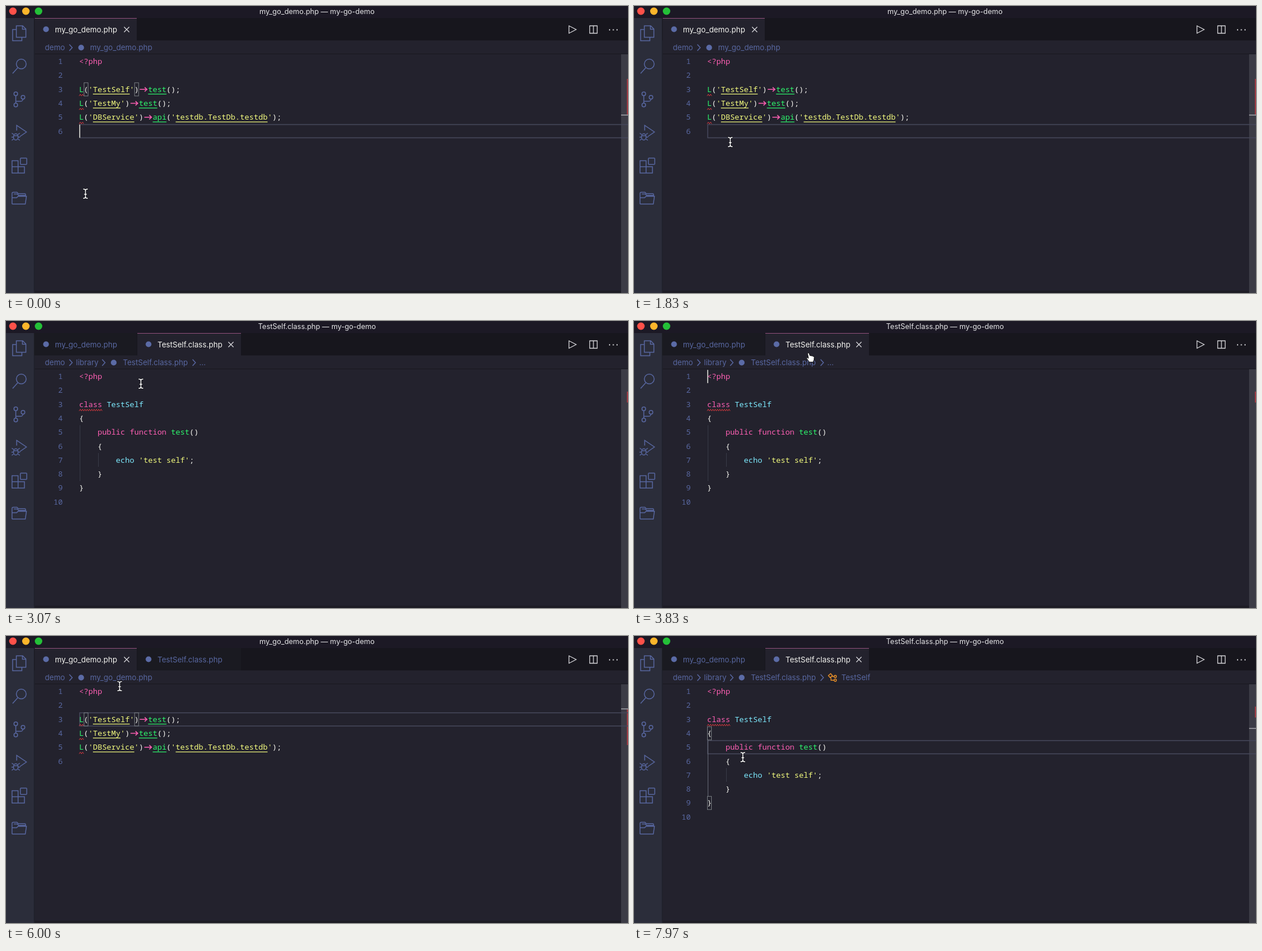
Animation of 1080x500 px, one loop 8 s. Source, as an HTML page:

```html
<!DOCTYPE html>
<html lang="en">
<head>
<meta charset="utf-8">
<title>Go to definition</title>
<style>
  html, body { margin: 0; width: 100%; height: 100%; overflow: hidden; background: #23222d; }
  svg { display: block; width: 1080px; height: 500px; }
  text { white-space: pre; font: 13.1px Inter, sans-serif; }
  .code text { font: 13.3px "Noto Sans Mono", monospace; }
  .ui text, .num { fill: #5867a0; }
  .line { fill: none; stroke: #5867a0; stroke-width: 1.5; }
  .tool { fill: none; stroke: #d4d4d8; stroke-width: 1.3; }
  .dot { fill: #5b6ba6; }
  .w { fill: #f8f8f2; } .g { fill: #2df86d; } .y { fill: #f3fb7e; }
  .p { fill: #fd5fb3; } .c { fill: #7de9fd; }
  .arrow { fill: none; stroke: #fd5fb3; stroke-width: 1.5; }
  .wave { fill: none; stroke: #e83a40; stroke-width: .9; }
  .match { fill: none; stroke: #777c80; }
  .class-icon { fill: none; stroke: #ee9327; stroke-width: 1.3; }
  #title { font-size: 12.5px; fill: #e4e4e6; text-anchor: middle; }
  #beam { fill: none; stroke-linecap: round; }
</style>
</head>
<body>
<svg viewBox="0 0 1080 500">
  <defs>
    <path id="beamShape" d="M-3.5 -8Q0 -8 0 -5.5Q0 -8 3.5 -8M0 -5.5V5.5M-3.5 8Q0 8 0 5.5Q0 8 3.5 8M-1.8 1H1.8"/>
  </defs>
  <rect width="1080" height="500" fill="#23222d"/>
  <rect y="21" width="49" height="479" fill="#2b2d3a"/>
  <rect x="49" y="21" width="1031" height="39" fill="#17161d"/>
  <rect width="1080" height="21" fill="#1c1925"/>
  <circle cx="12" cy="9" r="6.5" fill="#ff5149"/>
  <circle cx="34.5" cy="9" r="6.5" fill="#fdb52b"/>
  <circle cx="56.5" cy="9" r="6.5" fill="#24c038"/>
  <text id="title" x="540" y="13.5"></text>

  <g class="line">
    <path d="M18 34.5H29L34.5 40V54.5H18ZM28.5 35V40.5H34M18 41H11.5V60.5H27.5V55"/>
    <circle cx="26.5" cy="101" r="8.5"/><path d="M20.5 107.5L11.5 117.5"/>
    <circle cx="17" cy="153" r="3.2"/><circle cx="17" cy="172.5" r="3.2"/><circle cx="29.5" cy="159" r="3.2"/>
    <path d="M17 156.5V169M29.5 162.5Q29 166 25 166H17"/>
    <path d="M18.5 217V208L35.5 219.5L24 227.5"/>
    <ellipse cx="17" cy="228" rx="4" ry="5.5"/>
    <path d="M13 226H21M10 221.5L13.5 224M24 221.5L20.5 224M9.5 228.5H13M21 228.5H24.5M10 234L13.5 231.5M24 234L20.5 231.5"/>
    <path d="M10.5 269.5H21V291H10.5ZM10.5 280H32V291H21M32 280V291"/>
    <rect x="25" y="265" width="11" height="11" rx="1"/>
    <path d="M10.5 345V326.5Q10.5 324.5 12.5 324.5H19L21.5 327H32.5Q34 327 34 328.5V331M10.5 345H33.5L35.5 331.5H21L18.5 334H11M13.5 327.5H19.5L22 330H34"/>
  </g>
  <rect x="48.5" y="21" width="1" height="479" fill="#1d1e26"/>

  <g id="tabs" class="ui"></g>
  <g class="tool">
    <path d="M977.5 34.5L990 41L977.5 47.5Z"/>
    <path d="M1013.5 34.5H1026.5V47.5H1013.5ZM1020 34.5V47.5"/>
    <path d="M1047 41.5h2m4.5 0h2m4.5 0h2" stroke-width="2"/>
  </g>
  <g id="crumbs" class="ui"></g>
  <rect x="50" y="83" width="1030" height="1" fill="#18181f"/>
  <rect x="50" y="496" width="1030" height="4" fill="#1d1c25"/>
  <rect x="1068" y="84" width="12" height="416" fill="#3c3c46"/>
  <rect id="errors" x="1078" width="2" fill="#9d3a43"/>
  <rect id="ruler" x="1068" width="12" height="2" fill="#8b8b92"/>

  <rect id="current" x="128" width="960" height="23" fill="none" stroke="#45475a" stroke-width="1.6"/>
  <g id="demo" class="code"></g>
  <g id="self" class="code"></g>
  <rect id="caret" width="2" height="23" fill="#b9b9b6"/>
  <g id="mouse">
    <g id="beam">
      <use href="#beamShape" stroke="#15151b" stroke-width="3"/>
      <use href="#beamShape" stroke="#fff" stroke-width="1.4"/>
    </g>
    <path id="hand" d="M-4.5 -5Q-4 -7.5 -2 -6L-.5 -1.5Q1 -2.8 2.2 -1Q4 -2 5 -.2Q7 -.8 7 1.5L6.5 5.5L5 9.5H-1.5L-6 3.5Q-7 1 -4.5 2L-3 3.2Z" fill="#fff" stroke="#111"/>
  </g>
</svg>
<script>
const LOOP = 8000, CHAR = 7.98, LEFT = 127;
const $ = id => document.getElementById(id);
const mid = line => 96.7 + (line - 1) * 24.27;
const show = (id, on) => $(id).setAttribute('visibility', on ? 'inherit' : 'hidden');
const put = (id, attrs) => { for (const k in attrs) $(id).setAttribute(k, attrs[k]); };
const label = (x, y, text, extra = '') => `<text x="${x}" y="${y}" ${extra}>${text}</text>`;
const dot = (x, y) => `<circle class="dot" cx="${x}" cy="${y}" r="5"/>`;
const chevron = x => `<path class="line" d="M${x} 67l5 5.5l-5 5.5"/>`;

// Each token starts with its colour key; an upper-case key makes it an underlined link.
function row(line, tokens) {
  const y = mid(line);
  let col = 0, out = '';
  for (const token of tokens) {
    const key = token[0], text = token.slice(1), color = key.toLowerCase();
    const x = LEFT + col * CHAR;
    if (text === '->')
      out += `<path class="arrow" d="M${x + 1.5} ${y}h12.5m-4 -3.6l4 3.6l-4 3.6"/>`;
    else if (key === color)
      out += label(x, y + 4.5, text.replace('<', '&lt;'), `class="${color}"`);
    else
      out += `<g class="${color}" id="${line}-${text}">${label(x, y + 4.5, text)}
        <rect x="${x}" y="${y + 7.6}" width="${text.length * CHAR}" height="1.2"/></g>`;
    col += text.length;
  }
  return out;
}
const numbers = count => Array.from({length: count}, (_, i) =>
  label(98.5, mid(i + 1) + 4.5, i + 1, 'class="num" text-anchor="end"')).join('');
const wave = (line, chars) =>
  `<path class="wave" d="M${LEFT} ${mid(line) + 11.5}${'l2 -3l2 3'.repeat(chars * 2)}"/>`;
const match = (line, col) =>
  `<rect class="match" x="${LEFT + col * CHAR + .5}" y="${mid(line) - 11.5}" width="7" height="23"/>`;

$('demo').innerHTML = numbers(6) + row(1, ['p<?php'])
  + row(3, ['gL', 'w(', "y'", 'YTestSelf', "y'", 'w)', 'p->', 'Gtest', 'w();'])
  + row(4, ['gL', 'w(', "y'", 'YTestMy', "y'", 'w)', 'p->', 'Gtest', 'w();'])
  + row(5, ['gL', 'w(', "y'", 'YDBService', "y'", 'w)', 'p->', 'Gapi', 'w(', "y'", 'Ytestdb.TestDb.testdb', "y'", 'w);'])
  + [3, 4, 5].map(n => wave(n, 1)).join('')
  + `<g id="parens">${match(3, 1)}${match(3, 12)}</g>`;

$('self').innerHTML = numbers(10)
  + '<path id="guide" d="M128.5 181.5V279"/><path d="M160.5 230V254" stroke="#383a47"/>'
  + row(1, ['p<?php']) + row(3, ['pclass ', 'cTestSelf']) + row(4, ['w{'])
  + row(5, ['w    ', 'ppublic ', 'pfunction ', 'gtest', 'w()']) + row(6, ['w    {'])
  + row(7, ['w        ', 'cecho ', "y'test self'", 'w;']) + row(8, ['w    }']) + row(9, ['w}'])
  + wave(3, 5) + `<g id="braces">${match(4, 0)}${match(9, 0)}</g>`;

const tab = (id, x, width, name) => `<g id="${id}">
  <rect x="${x}" y="21" width="${width}" height="39" fill="#1a1a21"/>
  <g id="${id}On"><rect x="${x}" y="21" width="${width}" height="39" fill="#23222d"/>
  <rect x="${x}" y="21" width="${width}" height="1" fill="#92507c"/>
  <path class="tool" d="M${x + width - 22} 36.5l9 9m0 -9l-9 9"/></g>
  ${dot(x + 19.5, 40.5)}${label(x + 35, 46, name, `id="${id}Name"`)}</g>`;
$('tabs').innerHTML = tab('tabA', 50, 177, 'my_go_demo.php') + tab('tabB', 228, 180, 'TestSelf.class.php');

$('crumbs').innerHTML = label(67.5, 77, 'demo') + chevron(110)
  + `<g id="crumbA">${dot(130.5, 72.5)}${label(146, 77, 'my_go_demo.php')}</g>
  <g id="crumbB">${label(121.5, 77, 'library')}${chevron(167)}${dot(187, 72.5)}${label(203, 77, 'TestSelf.class.php')}
  <g id="crumbMore">${chevron(324)}</g>${label(335.5, 77, '...', 'id="crumbDots"')}
  <g id="crumbClass"><g class="class-icon">
    <path d="M337.5 69l4 -3.5l3 3.5l-4 3.5ZM343.5 70.5H347M342 72V77H347"/>
    <circle cx="349.5" cy="70.5" r="2"/><circle cx="349.5" cy="77" r="2"/></g>
  ${label(360, 77, 'TestSelf')}</g></g>`;

// start time, line, caret x, marked pair
const spots = [
  [0, 6, 127, ''], [2270, 3, 174, 'parens'], [2433, 1, 127, ''],
  [5500, 3, 174, 'parens'], [6900, 3, 262, ''], [7060, 5, 127, 'braces']
];
// time, x, y
const path = [
  [0, 138, 327], [1170, 159, 339], [1500, 160, 330], [2150, 174, 149], [2600, 174, 149],
  [3600, 306, 62], [4100, 306, 62], [5030, 235, 90], [5400, 150, 43], [5600, 150, 43],
  [6500, 263, 149], [7400, 263, 149], [7970, 189, 211], [8000, 189, 211]
];
function mouseAt(t) {
  const i = path.findIndex(p => p[0] > t), [t0, x0, y0] = path[i - 1], [t1, x1, y1] = path[i];
  const u = (t - t0) / (t1 - t0), e = u * u * (3 - 2 * u);
  return [x0 + (x1 - x0) * e, y0 + (y1 - y0) * e];
}
const within = (t, a, b) => t >= a && t < b;

function draw(t) {
  const selfTab = within(t, 2370, 5500) || t >= 7030;
  const selfCode = within(t, 2433, 5500) || t >= 7060;
  const [start, line, x, pair] = spots.filter(s => s[0] <= t).pop();
  const y = mid(line);

  $('title').textContent = (selfCode ? 'TestSelf.class.php' : 'my_go_demo.php') + ' — my-go-demo';
  show('tabB', t >= 2370);
  show('tabAOn', !selfTab);
  show('tabBOn', selfTab);
  $('tabAName').style.fill = selfTab ? '' : '#f4f4f0';
  $('tabBName').style.fill = selfTab ? '#f4f4f0' : '';
  show('crumbA', !selfTab);
  show('crumbB', selfTab);
  show('crumbMore', selfTab && selfCode);
  show('crumbDots', selfCode && t < 7060);
  show('crumbClass', t >= 7060);

  show('demo', !selfCode);
  show('self', selfCode);
  show('parens', !selfCode && (pair === 'parens' || t < 60));
  show('braces', pair === 'braces');
  put('guide', {stroke: pair === 'braces' ? '#666975' : '#383a47'});
  put('3-TestSelf', {class: within(t, 2120, 2433) ? 'c' : 'y'});
  put('3-test', {class: within(t, 6600, 7060) ? 'c' : 'g'});

  show('current', line > 1);
  show('ruler', line > 1);
  put('current', {y: y - 11.5});
  put('ruler', {y: {3: 126, 5: 160, 6: 189}[line] || 84});
  put('errors', selfCode ? {y: 123, height: 19} : {y: 127, height: 63});
  show('caret', (t - start) % 1000 < 500);
  put('caret', {x, y: y - 11.5});

  const [mx, my] = mouseAt(t);
  put('mouse', {transform: `translate(${mx} ${my})`});
  show('beam', my >= 80);
  show('hand', my < 80);
}

function tick() {
  draw(performance.now() % LOOP);
  requestAnimationFrame(tick);
}
tick();
</script>
</body>
</html>
```
